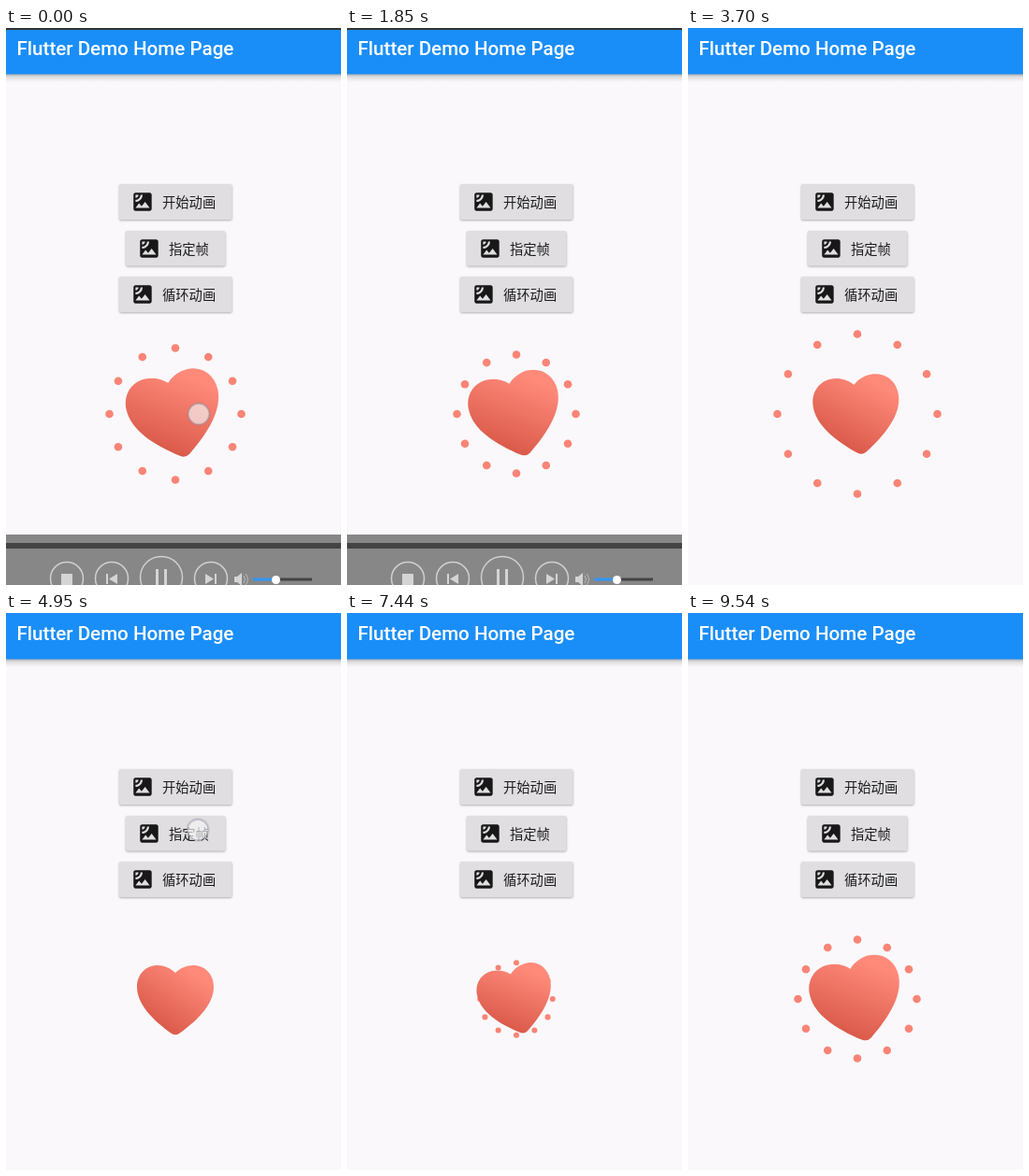
These frames come from a looping animation (358x596 px, 9610 ms). An HTML page:

```html
<!DOCTYPE html>
<html lang="zh">
<head>
<meta charset="utf-8">
<title>Flutter Demo Home Page</title>
<style>
  html, body { margin: 0; width: 100%; height: 100%; overflow: hidden; background: #faf8fa; }
  svg { display: block; width: 358px; height: 596px; }
  .title { font: 500 20.6px Roboto, sans-serif; fill: #fff; }
  .label { font: 500 14.3px "Noto Sans CJK SC", "Noto Sans CJK", sans-serif; fill: #1b1b1c; }
  .button { filter: drop-shadow(0 1.5px 1.2px rgba(0, 0, 0, .3)); }
  .pressed { filter: drop-shadow(0 3px 3px rgba(0, 0, 0, .36)); }
</style>
</head>
<body>
<svg viewBox="0 0 358 596">
  <defs>
    <linearGradient id="shade" x1="0" y1="0" x2="0" y2="1">
      <stop offset="0" stop-color="#000" stop-opacity=".3"/>
      <stop offset=".4" stop-color="#000" stop-opacity=".1"/>
      <stop offset="1" stop-color="#000" stop-opacity="0"/>
    </linearGradient>
    <linearGradient id="coral" gradientUnits="userSpaceOnUse" x1="-17" y1="27" x2="20" y2="-28">
      <stop offset="0" stop-color="#db5b4b"/>
      <stop offset="1" stop-color="#ff8a7a"/>
    </linearGradient>
    <path id="icon" fill="#181818" d="M19 3H5c-1.1 0-2 .9-2 2v14c0 1.1.9 2 2 2h14c1.1 0 2-.9 2-2V5c0-1.1-.9-2-2-2zM5 5h3C8 6.65 6.66 8 5 8V5zM5 12v-2c2.76 0 5-2.25 5-5h2C12 8.86 8.87 12 5 12zm0 6l3.5-4.5 2.5 3L14.500 12l4.500 6H5z"/>
  </defs>

  <rect width="358" height="596" fill="#faf8fa"/>
  <rect y="49" width="358" height="9" fill="url(#shade)"/>
  <rect width="358" height="49.500" fill="#1a8ef8"/>
  <text class="title" x="11.500" y="29">Flutter Demo Home Page</text>

  <g id="buttons"></g>
  <g id="dots" fill="#fa8476"></g>
  <path id="heart" fill="url(#coral)" d="M0-28C-5-33-12-36-19-36C-32-36-41-26-41-13C-41 5-25 22-4 37Q0 39.500 4 37C25 22 41 5 41-13C41-26 32-36 19-36C12-36 5-33 0-28Z"/>
  <g id="touch">
    <circle r="13" fill="#8c8c9a" fill-opacity=".16"/>
    <circle r="11" fill="#fff" fill-opacity=".6" stroke="#9a9aa8" stroke-opacity=".55" stroke-width="1.300"/>
  </g>

  <g id="player">
    <rect width="358" height="2" fill="#333"/>
    <rect y="542" width="358" height="54" fill="#000" fill-opacity=".46"/>
    <rect y="551" width="358" height="6" fill="#444"/>
    <g fill="none" stroke="#d0d0d0" stroke-width="1.500">
      <circle cx="65" cy="589" r="17.500"/>
      <circle cx="113" cy="589" r="17.500"/>
      <circle cx="166" cy="588" r="22.500"/>
      <circle cx="219" cy="589" r="17.500"/>
    </g>
    <g fill="#d4d4d4">
      <rect x="59" y="584" width="12" height="12"/>
      <path d="M107 584h2v11h-2zM119 584v11l-9-5.500zM213 584v11l9-5.500zM223 584h2v11h-2z"/>
      <path d="M160 579h3v18h-3zM169 579h3v18h-3zM244 587h3l5-4v14l-5-4h-3z"/>
    </g>
    <path d="M254 586q3 4 0 8M256 584q5 6 0 12" fill="none" stroke="#bbb"/>
    <path d="M288 590H327" stroke="#444" stroke-width="3"/>
    <path d="M264 590H288" stroke="#2e97f5" stroke-width="3"/>
    <circle cx="288.500" cy="590.500" r="4.500" fill="#fff"/>
  </g>
</svg>
<script>
const LOOP = 9610, CYCLE = 1010, STOP = 340;
const $ = id => document.getElementById(id);

function add(parent, tag, attrs) {
  const el = document.createElementNS('http://www.w3.org/2000/svg', tag);
  for (const k in attrs) el.setAttribute(k, attrs[k]);
  return parent.appendChild(el);
}

// x, y, width, height, label
const buttons = [
  [121, 167, 120.5, 38, '开始动画'],
  [128, 217, 106.5, 37.5, '指定帧'],
  [121, 266, 120.5, 38, '循环动画']
].map(([x, y, w, h, label], i) => {
  const g = add($('buttons'), 'g', {});
  const box = { x, y, width: w, height: h, rx: 2 };
  const base = add(g, 'rect', { ...box, fill: '#e0dee1', class: 'button' });
  const clip = add(g, 'clipPath', { id: 'clip' + i });
  add(clip, 'rect', box);
  const glow = add(g, 'rect', { ...box, fill: '#000' });
  const ripple = add(g, 'circle', { fill: '#000', 'clip-path': `url(#clip${i})` });
  add(g, 'use', { href: '#icon', transform: `translate(${x + 12} ${y + 6}) scale(1.08)` });
  add(g, 'text', { class: 'label', x: x + 46, y: y + 25.3 }).textContent = label;
  return { base, glow, ripple };
});

const dots = Array.from({ length: 12 }, () => add($('dots'), 'circle', {}));

// Bursts of screen updates: first, last, count
const bursts = [
  [80, 610, 8], [1290, 2230, 13], [2300, 2550, 4], [2930, 3870, 13], [3920, 4170, 4],
  [4950, 5630, 10], [6740, 6740, 1], [6890, 7820, 13], [7900, 7970, 2],
  [8280, 9230, 13], [9300, 9540, 4]
];

// Taps: time, x, y, button index
const taps = [
  [-150, 206, 413, -1], [1290, 206, 413, -1], [2930, 214, 187, 0],
  [4950, 205, 232, 1], [6740, 202, 289, 2]
];

function snap(t) {
  let s = 0;
  for (const [a, b, n] of bursts) {
    if (t < a) break;
    const step = n > 1 ? (b - a) / (n - 1) : 1;
    const i = Math.min(n - 1, Math.floor((t - a + 5) / step));
    s = Math.floor((a + i * step) / 10) * 10;
  }
  return s;
}

const clamp = (v, lo = 0, hi = 1) => Math.min(hi, Math.max(lo, v));

function track(keys, p) {
  if (p <= keys[0][0]) return keys[0][1];
  for (let i = 1; i < keys.length; i++) {
    const [a, u] = keys[i - 1], [b, v] = keys[i];
    if (p <= b) return u + (v - u) * (p - a) / (b - a);
  }
  return keys[keys.length - 1][1];
}

const scaleKeys = [[20, 0], [50, .18], [200, .95], [300, 1.185], [340, 1.22], [400, 1.22], [500, 1.1], [610, 1]];
const turnKeys = [[400, -13], [500, -5], [610, 0]];
const reachKeys = [[160, 25], [300, 63.5], [340, 70.5], [400, 79], [480, 85.5], [700, 88]];
const sizeKeys = [[160, 0], [170, 2], [260, 4.3], [600, 4.3], [1000, 0]];

function phase(t) {
  if (t < 1530) return clamp(STOP + 230 - t, 0, STOP);
  if (t < 3150) return Math.min(t - 1530, CYCLE);
  if (t < 5290) return Math.min(t - 3150, CYCLE);
  if (t < 7220) return Math.min(t - 5290, STOP);
  return (t - 7220) % CYCLE;
}

function drawHeart(p) {
  $('heart').setAttribute('transform',
    `translate(181 413) rotate(${track(turnKeys, p)}) scale(${track(scaleKeys, p)})`);
  const reach = track(reachKeys, p), size = track(sizeKeys, p);
  dots.forEach((dot, i) => {
    const a = i * Math.PI / 6;
    dot.setAttribute('cx', 181 + reach * Math.cos(a));
    dot.setAttribute('cy', 413 + reach * Math.sin(a));
    dot.setAttribute('r', size);
  });
}

function drawTaps(t) {
  let shown = 0;
  for (const [at, x, y, index] of taps) {
    const age = t - at;
    if (age >= 0 && age < 400) {
      shown = clamp((400 - age) / 120);
      $('touch').setAttribute('transform', `translate(${x} ${y})`);
    }
    if (index < 0) continue;
    const { base, glow, ripple } = buttons[index];
    const held = age > 80 ? clamp((520 - age) / 200) : 0;
    base.setAttribute('class', held > .3 ? 'pressed' : 'button');
    glow.setAttribute('opacity', .045 * held);
    ripple.setAttribute('opacity', .05 * held);
    ripple.setAttribute('cx', x);
    ripple.setAttribute('cy', y);
    ripple.setAttribute('r', clamp((age - 80) * .24, 0, 110));
  }
  $('touch').setAttribute('opacity', shown);
}

function frame() {
  const t = snap(performance.now() % LOOP);
  drawHeart(phase(t));
  drawTaps(t);
  $('player').setAttribute('opacity', clamp((2550 - t) / 320));
  requestAnimationFrame(frame);
}
frame();
</script>
</body>
</html>
```
